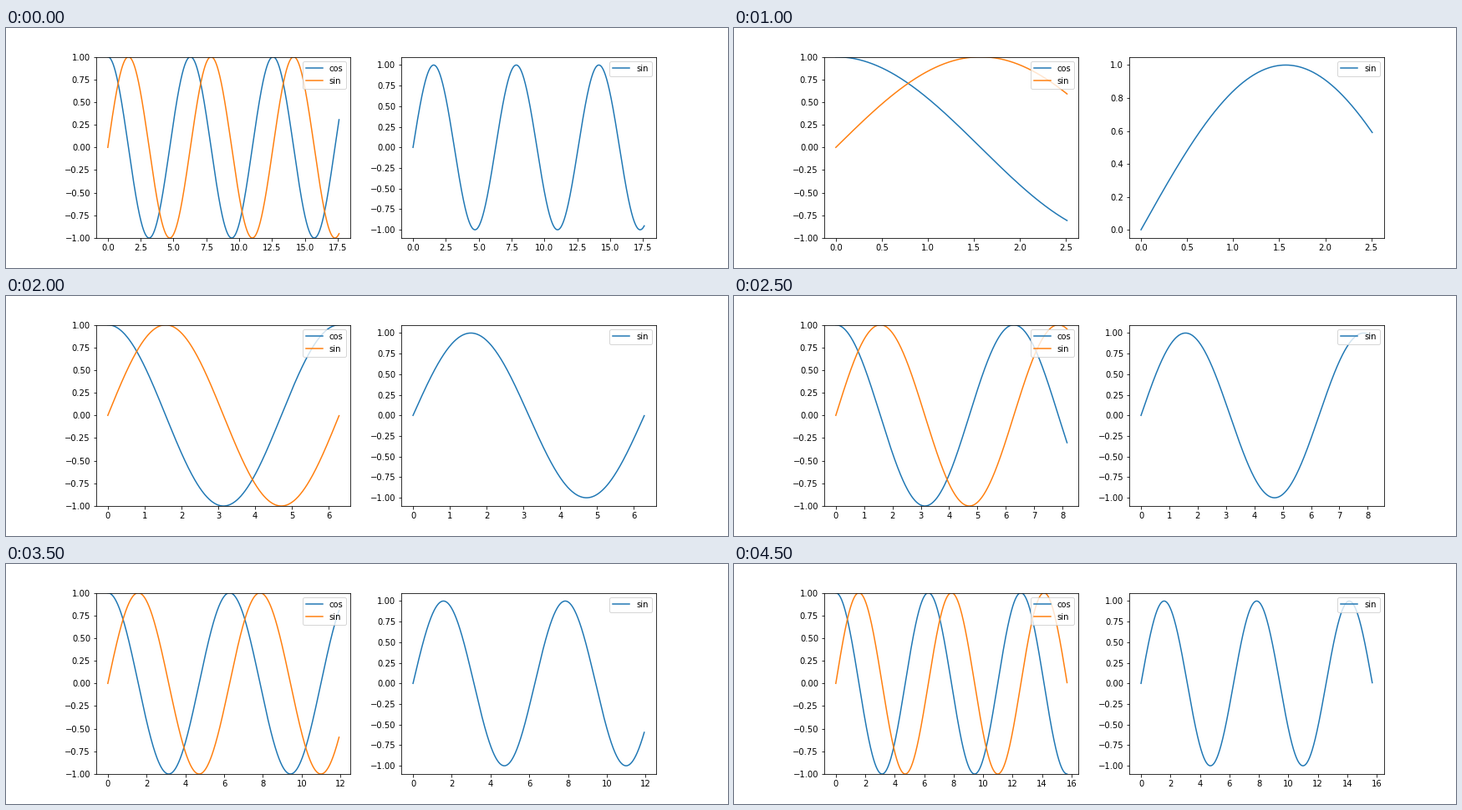
Recreate the animation shown at these times as a matplotlib script. Size 864 px wide and 288 px high, loop 5 s.

```python
import matplotlib.pyplot as plt
import numpy as np
from matplotlib.animation import FuncAnimation

FRAMES = 10
INTERVAL = 500  # ms

plt.rcParams.update({"font.family": "DejaVu Sans", "font.size": 10})

fig, (left, right) = plt.subplots(1, 2, figsize=(12, 4), dpi=72)
fig.subplots_adjust(left=0.125, right=0.9, bottom=0.125, top=0.88, wspace=0.2)

curves = [
    (left.plot([], [], label="cos")[0], np.cos),
    (left.plot([], [], label="sin")[0], np.sin),
    (right.plot([], [], label="sin")[0], np.sin),
]
left.set_ylim(-1, 1)
for ax in (left, right):
    ax.legend(loc="upper right")


def draw(i):
    # The loop opens on the longest curve, then restarts from the shortest.
    step = (i - 1) % FRAMES
    x = np.arange(0, (0.2 + 0.6 * step) * np.pi, 0.01)
    for line, func in curves:
        line.set_data(x, func(x))
    for ax in (left, right):
        ax.relim()
        ax.autoscale_view()
    return [line for line, _ in curves]


anim = FuncAnimation(fig, draw, frames=FRAMES, interval=INTERVAL,
                     repeat=True, repeat_delay=0, blit=False)
plt.show()
```
